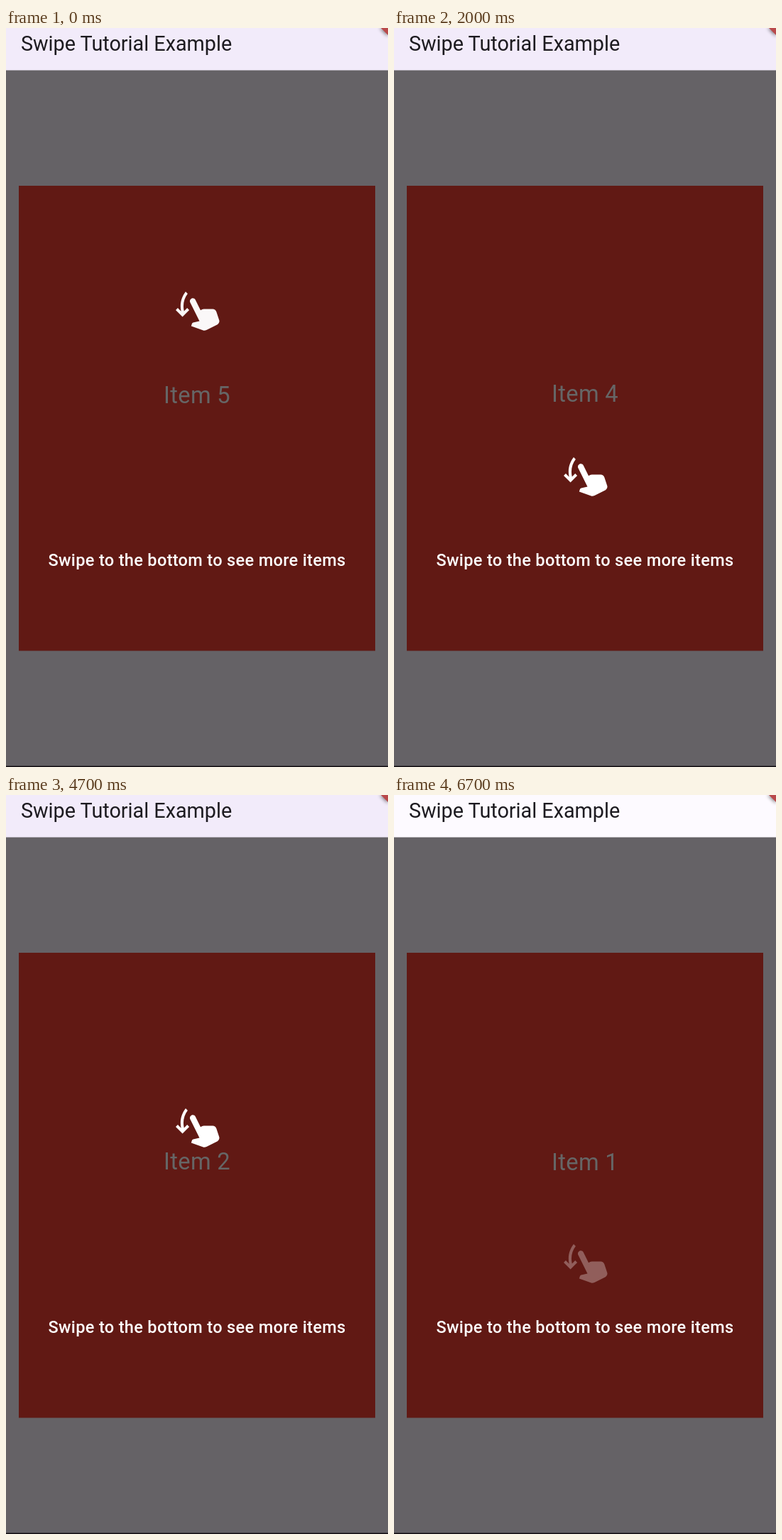
These frames come from a looping animation (538x1040 px, 6800 ms). An HTML page:

```html
<!DOCTYPE html>
<html lang="en">
<head>
<meta charset="utf-8">
<title>Swipe Tutorial Example</title>
<style>
  html, body { margin: 0; width: 100%; height: 100%; overflow: hidden; background: #656266; }
  svg { display: block; width: 100%; height: 100%; }
  text { font-family: Roboto, sans-serif; }
  #title { font-size: 28.77px; fill: #1d1b20; }
  .item { font-size: 32.7px; letter-spacing: .33px; fill: #666; text-anchor: middle; }
  #caption { font-size: 23.54px; font-weight: 500; letter-spacing: .327px; fill: #fff; text-anchor: middle; }
</style>
</head>
<body>
<svg viewBox="0 0 538 1040">
  <defs>
    <clipPath id="viewport"><rect x="18" y="222" width="502" height="654.5"/></clipPath>
    <filter id="soft" x="-100%" y="-100%" width="300%" height="300%"><feGaussianBlur stdDeviation="2.5"/></filter>
  </defs>
  <rect width="538" height="1040" fill="#656266"/>
  <rect id="bar" width="538" height="59.5" fill="#f2ebfa"/>
  <text id="title" x="20.9" y="32">Swipe Tutorial Example</text>
  <path d="M526 0H538V12Z" fill="#000" opacity=".5" filter="url(#soft)"/>
  <path d="M528 0H538V10Z" fill="#b9484a"/>
  <rect x="18" y="222" width="502" height="654.5" fill="#611914"/>
  <g id="pages" clip-path="url(#viewport)"></g>
  <text id="caption" x="269" y="757">Swipe to the bottom to see more items</text>
  <path id="hand" fill="#fff" d="M3.8 12.18c-.2-.86-.3-1.76-.3-2.68 0-2.84.99-5.45 2.63-7.5L7.2 3.07C5.82 4.85 5 7.08 5 9.5c0 .88.11 1.74.32 2.56l1.62-1.62L8 11.5 4.5 15 1 11.5l1.06-1.06zM13.85 11.62l-2.68-5.37c-.37-.74-1.27-1.04-2.01-.67C8.41 5.96 8.11 6.86 8.48 7.6l4.81 9.6L10.05 18c-.33.09-.59.33-.7.66L9 19.78l6.19 2.25c.5.17 1.28.02 1.75-.22l5.51-2.75c.89-.45 1.32-1.48 1-2.42l-1.43-4.27c-.27-.82-1.04-1.37-1.9-1.37h-4.56c-.31 0-.62.07-.89.21z"/>
  <rect y="1038.5" width="538" height="1.5" fill="#100c10"/>
</svg>
<script>
const LOOP = 6800, STEP = 100, HAND_CYCLE = 1500;
const PAGE = 589, ITEM_BASELINE = 528;
const SWIPES = [1414, 2800, 4097, 5294];      // middle of each swipe, ms

// Values spaced one STEP apart
const HAND_TOP = [339, 342, 348, 357, 371, 391, 441, 543, 580, 604, 621, 632, 638, 640, 640];
const HAND_ALPHA = [.03, .13, .33, .67, .97, 1, 1, 1, 1, 1, .7, .3, .1, 0, 0];
const DRAG = [0, 24, 139, 299, 460, 537];     // from 300 ms before the middle

const byId = id => document.getElementById(id);
const bar = byId('bar'), hand = byId('hand');

const items = [5, 4, 3, 2, 1].map(n => {
  const label = document.createElementNS('http://www.w3.org/2000/svg', 'text');
  label.setAttribute('class', 'item');
  label.setAttribute('x', 269);
  label.textContent = 'Item ' + n;
  byId('pages').append(label);
  return label;
});

// Finger drag, then an overdamped spring settling on the page
function swipeDistance(ms) {
  const pos = (ms + 300) / STEP;
  if (pos <= 0) return 0;
  if (pos >= 5) return PAGE - 52 * 0.403 ** (pos - 5);
  const i = Math.floor(pos);
  return DRAG[i] + (DRAG[i + 1] - DRAG[i]) * (pos - i);
}

function draw(t) {
  const scroll = SWIPES.reduce((sum, mid) => sum + swipeDistance(t - mid), 0);
  items.forEach((label, i) => label.setAttribute('y', ITEM_BASELINE + scroll - i * PAGE));

  const phase = (t + 400) % HAND_CYCLE / STEP;
  hand.setAttribute('transform', `translate(236.3 ${HAND_TOP[phase] - 5.45}) scale(2.724)`);
  hand.setAttribute('opacity', HAND_ALPHA[phase]);

  bar.setAttribute('fill', t < 6200 ? '#f2ebfa' : '#fdfaff');
}

const start = performance.now();
function frame() {
  const t = (performance.now() - start) % LOOP;
  draw(Math.floor(t / STEP) * STEP);
  requestAnimationFrame(frame);
}
frame();
</script>
</body>
</html>
```
